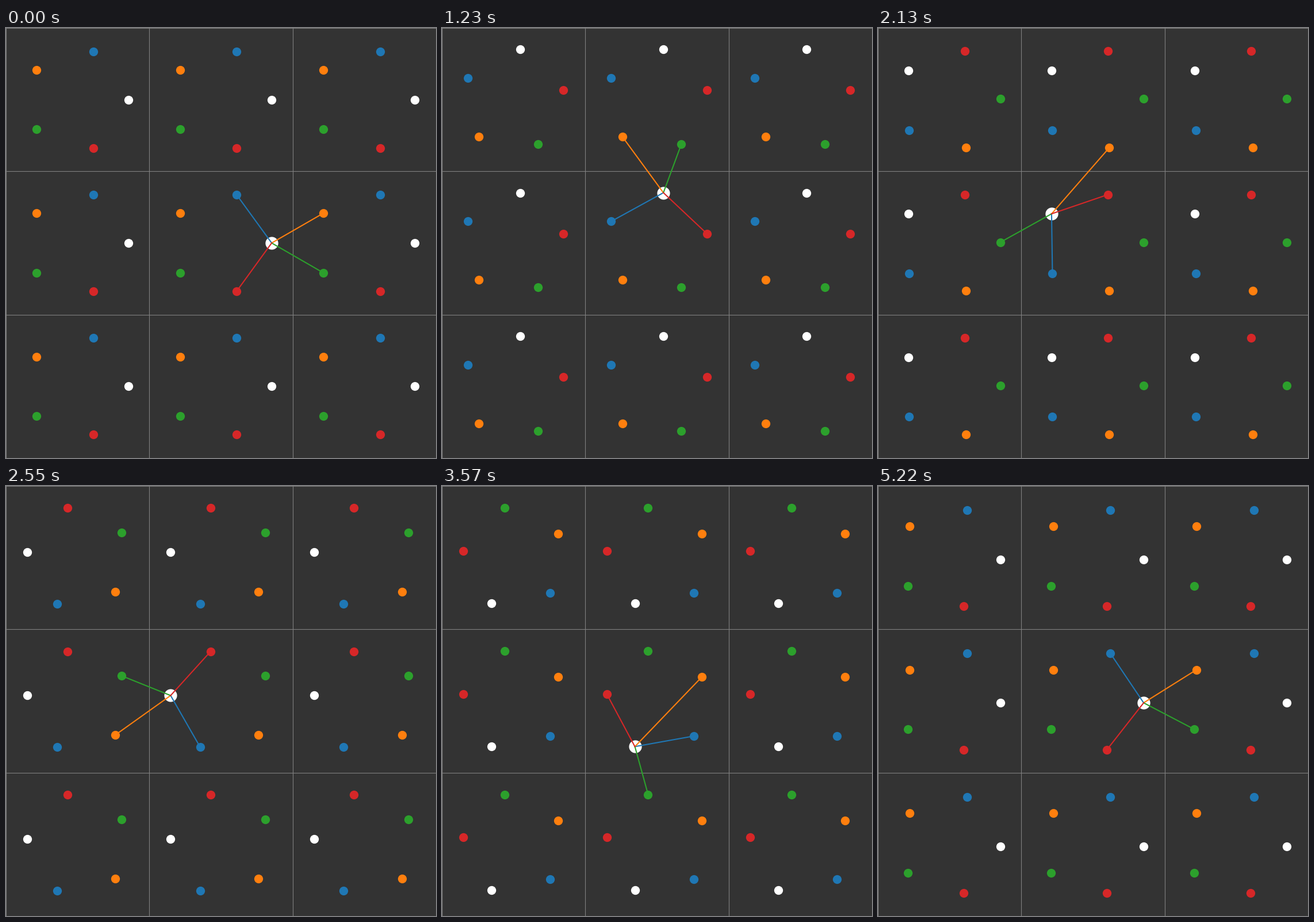
A matplotlib script for the animation above (5250 ms loop, 748x748 px).

```python
import numpy as np
import matplotlib.pyplot as plt
from matplotlib.animation import FuncAnimation

SIZE, DPI = 748, 100
FRAMES, INTERVAL = 175, 30
RADIUS = np.sqrt(2) / 4
COLORS = ["white", "tab:blue", "tab:orange", "tab:green", "tab:red"]

# Lower-left corners of the 3 x 3 periodic cells
CELLS = np.array([(i, j) for i in range(3) for j in range(3)])

fig = plt.figure(figsize=(SIZE / DPI, SIZE / DPI), dpi=DPI, facecolor="#333333")
ax = fig.add_axes([0, 0, 1, 1])
ax.set(xlim=(0, 3), ylim=(0, 3))
ax.axis("off")

for v in range(4):
    ax.axvline(v, color="gray", lw=0.8, zorder=1)
    ax.axhline(v, color="gray", lw=0.8, zorder=1)

dots = [ax.plot([], [], "o", color=c, ms=10, zorder=2)[0] for c in COLORS]
hub, = ax.plot([], [], "o", color="white", ms=15, zorder=3)
links = [ax.plot([], [], color=c, lw=1.5, zorder=4)[0] for c in COLORS[1:]]


def positions(frame):
    """Ring positions inside the unit cell; the first pose is held twice."""
    turn = 2 * np.pi * max(frame - 1, 0) / (FRAMES - 1)
    angles = turn + 2 * np.pi * np.arange(len(COLORS)) / len(COLORS)
    return 0.5 + RADIUS * np.column_stack([np.cos(angles), np.sin(angles)])


def update(frame):
    pts = positions(frame)
    for dot, p in zip(dots, pts):
        dot.set_data(*(CELLS + p).T)

    center = pts[0] + 1
    hub.set_data([center[0]], [center[1]])
    for link, p in zip(links, pts[1:]):
        # Minimum image convention: connect to the nearest copy
        delta = p - pts[0]
        delta -= np.round(delta)
        link.set_data(*np.array([center, center + delta]).T)
    return [*dots, hub, *links]


anim = FuncAnimation(fig, update, frames=FRAMES, interval=INTERVAL,
                     repeat=True, repeat_delay=0)
plt.show()
```
